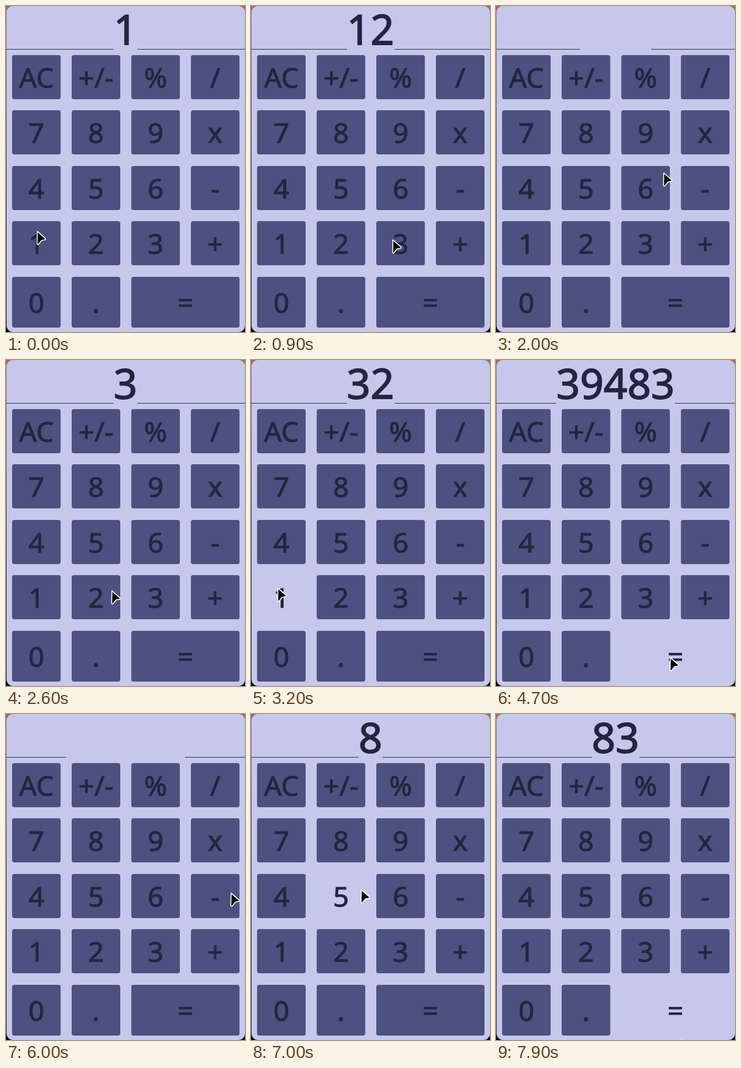
These frames come from a looping animation (433 px wide and 591 px high, 8000 ms). An HTML page:

```html
<!DOCTYPE html>
<html lang="en">
<head>
<meta charset="utf-8">
<title>Calculator</title>
<style>
  html, body { margin: 0; width: 100%; height: 100%; overflow: hidden; }
  body { position: relative; background: linear-gradient(#a86870, #6d4450 25%, #2b2028 60%, #0c0a10);
    font-family: "Noto Sans", sans-serif; color: #22263f; -webkit-text-stroke: 1.1px; }
  div, svg { position: absolute; }
  #panel { left: 1px; top: 0; width: 432px; height: 591px; border-radius: 12px; background: #c5c8eb; }
  #line { left: 1px; top: 78px; width: 432px; height: 1px; background: #22242f; }
  #gap { top: 1px; height: 80px; background: #c5c8eb; }
  #display { left: 0; top: 1px; width: 433px; font-size: 75px; line-height: 80px; text-align: center;
    -webkit-text-stroke: 1.8px; }
  .key { border-radius: 4px; background: #4c5180; font-size: 50px; text-align: center; }
  .key.lit { background: #c5c8eb; }
  #cursor { left: 0; top: 0; overflow: visible; }
</style>
</head>
<body>
<div id="panel"></div>
<div id="line"></div>
<div id="gap"></div>
<div id="display"></div>
<svg id="cursor" width="20" height="28">
  <path d="M.8 1.5 L15 14 Q17 16.5 14 17 L8.5 18 L3.4 24.5 Q.6 27 .3 23.5 Z"
    fill="#08080a" stroke="#fff" stroke-width="1.7" stroke-linejoin="round"/>
</svg>
<script>
const LOOP = 8000, STEP = 100, HOLD = 200, GLIDE = 800, DIGIT = 43;
const $ = id => document.getElementById(id);

const rows = ["AC +/- % /", "7 8 9 x", "4 5 6 -", "1 2 3 +", "0 . ="];
const keys = rows.flatMap((row, r) => row.split(" ").map((label, c) => {
  const key = { label, x: 11 + 108 * c, y: Math.floor(89 + 100.6 * r), w: label === "=" ? 196 : 88, h: r === 4 ? 92 : 80 };
  key.el = document.createElement("div");
  key.el.textContent = label;
  key.el.style.cssText = `left:${key.x}px;top:${key.y}px;width:${key.w}px;height:${key.h}px;line-height:${key.h}px`;
  document.body.insertBefore(key.el, $("cursor"));
  return key;
}));

// Pointer stops: time, x, y, and the key pressed there with the display it leaves
const stops = [
  [0, 56, 407, "1", "1"], [600, 162, 425, "2", "12"], [1100, 268, 422, "3", "123"],
  [1800, 360, 218, "x", ""], [2400, 230, 408, "3", "3"], [2900, 160, 424, "2", "32"],
  [3300, 48, 412, "1", "321"], [4100, 315, 538, "=", "39483"], [5900, 407, 323, "-", ""],
  [6500, 165, 232, "8", "8"], [7000, 199, 317], [7300, 266, 420, "3", "83"], [8000, 335, 589]
];
const presses = stops.filter(s => s[3]);

// Rests one step either side of each stop, and glides there with an ease-out
function pointer(t) {
  const i = Math.max(1, stops.findIndex(s => s[0] + STEP >= t));
  const [t0, x0, y0] = stops[i - 1], [t1, x1, y1] = stops[i];
  const end = t1 - STEP, start = Math.max(t0 + STEP, end - GLIDE);
  const k = Math.min(1, Math.max(0, (t - start) / (end - start)));
  const e = 1 - (1 - k) ** 2;
  return [x0 + (x1 - x0) * e, y0 + (y1 - y0) * e];
}

function draw(now) {
  const t = Math.floor(now % LOOP / STEP) * STEP;
  const past = presses.filter(p => p[0] <= t);
  const [time, , , pressed, text] = past.at(-1);
  // an emptied field keeps its former width
  const width = DIGIT * (text || past.at(-2)[4]).length;
  $("display").textContent = text;
  $("gap").style.left = 216.5 - width / 2 + "px";
  $("gap").style.width = width + "px";

  const [x, y] = pointer(t);
  $("cursor").style.transform = `translate(${x}px, ${y}px)`;
  // hover colour follows one step behind the pointer
  const [hx, hy] = pointer(Math.max(0, t - STEP));
  for (const k of keys) {
    const over = hx >= k.x && hx < k.x + k.w && hy >= k.y && hy < k.y + k.h;
    const down = k.label === pressed && t - time <= HOLD;
    k.el.className = over && !down ? "key lit" : "key";
  }
  requestAnimationFrame(draw);
}
requestAnimationFrame(draw);
</script>
</body>
</html>
```
